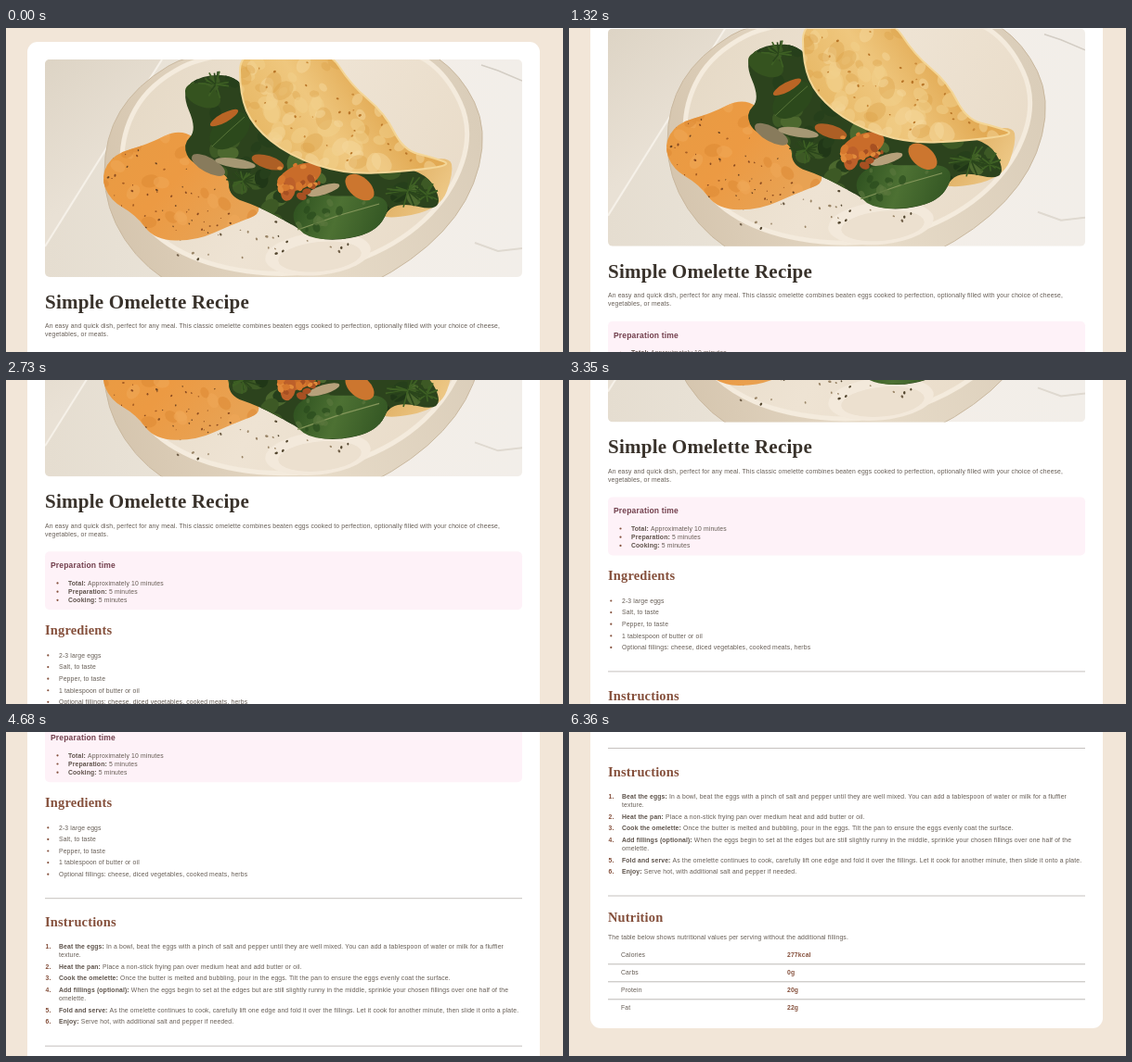
Recreate the animation shown at these times as an HTML page with a canvas. Size 600 by 350 pixels, loop 6.91 s.

```html
<!DOCTYPE html>
<html lang="en">
<head>
<meta charset="utf-8">
<title>Simple Omelette Recipe</title>
<style>
  html, body { margin: 0; width: 100%; height: 100%; overflow: hidden; background: #f2e6d8; }
  canvas { display: block; }
</style>
</head>
<body>
<canvas id="stage" width="600" height="350"></canvas>
<script>
const ctx = document.getElementById('stage').getContext('2d');

const SANS = '"Liberation Sans", Arial, sans-serif';
const SERIF = '"Liberation Serif", "Times New Roman", serif';
const STYLE = {
  title: { font: `bold 21px ${SERIF}`, gap: 0.25, color: '#39322b' },
  section: { font: `bold 14.4px ${SERIF}`, gap: 0.2, color: '#85503c' },
  label: { font: `bold 8.5px ${SANS}`, gap: 0.18, color: '#713f4c' },
  body: { font: `6.8px ${SANS}`, gap: 0.153, color: '#655c54' },
  strong: { font: `bold 6.8px ${SANS}`, gap: 0.153, color: '#5c5149' },
  accent: { font: `bold 6.8px ${SANS}`, gap: 0.153, color: '#85503c' }
};

// Scroll timeline: [time, offset, speed]
const LOOP = 6910, START = 770, END = 6360, STEP = (END - START) / 80;
const KEYS = [
  [700, 0, 0], [1320, 32.5, 0.084], [1950, 91, 0.094], [2730, 165, 0.095],
  [3980, 284, 0.101], [5380, 434, 0.104], [END, 521, 0]
];

function scrollAt(time) {
  if (time < START) return 0;
  const t = Math.min(END, START + Math.floor((time - START + 10) / STEP) * STEP);
  let i = 0;
  while (i < KEYS.length - 2 && t >= KEYS[i + 1][0]) i++;
  const [t0, y0, v0] = KEYS[i], [t1, y1, v1] = KEYS[i + 1];
  const d = t1 - t0, u = (t - t0) / d, w = 1 - u;
  return y0 * w * w * (1 + 2 * u) + y1 * u * u * (3 - 2 * u)
    + d * u * w * (v0 * w - v1 * u);
}

function seeded(seed) {
  return () => (seed = (seed * 16807) % 2147483647) / 2147483647;
}

function text(str, x, y, style) {
  ctx.font = style.font;
  ctx.letterSpacing = style.gap + 'px';
  ctx.fillStyle = style.color;
  ctx.fillText(str, x, y);
  return x + ctx.measureText(str).width;
}

function leadText(lead, rest, x, y) {
  text(' ' + rest, text(lead, x, y, STYLE.strong), y, STYLE.body);
}

function box(x, y, w, h, r, color) {
  ctx.beginPath();
  ctx.roundRect(x, y, w, h, r);
  ctx.fillStyle = color;
  ctx.fill();
}

function oval(x, y, rx, ry, color, turn = 0) {
  ctx.beginPath();
  ctx.ellipse(x, y, rx, ry, turn, 0, Math.PI * 2);
  ctx.fillStyle = color;
  ctx.fill();
}

function line(points, color, width) {
  ctx.beginPath();
  points.forEach(([x, y]) => ctx.lineTo(x, y));
  ctx.strokeStyle = color;
  ctx.lineWidth = width;
  ctx.stroke();
}

// Closed smooth outline through the midpoints of the given points
function blob(points) {
  const path = new Path2D();
  const n = points.length;
  const mid = i => {
    const a = points[i % n], b = points[(i + 1) % n];
    return [(a[0] + b[0]) / 2, (a[1] + b[1]) / 2];
  };
  path.moveTo(...mid(0));
  for (let i = 1; i <= n; i++) path.quadraticCurveTo(...points[i % n], ...mid(i));
  path.closePath();
  return path;
}

function gradient(x0, y0, x1, y1, ...colors) {
  const g = ctx.createLinearGradient(x0, y0, x1, y1);
  colors.forEach((c, i) => g.addColorStop(i / (colors.length - 1), c));
  return g;
}

function specks(seed, count, area, size, colors, clip) {
  const rand = seeded(seed), [x, y, w, h] = area;
  ctx.save();
  if (clip) ctx.clip(clip);
  for (let i = 0; i < count; i++) {
    const px = x + rand() * w, py = y + rand() * h, r = size * (0.4 + rand() * 0.6);
    oval(px, py, r * 1.4, r, colors[Math.floor(rand() * colors.length)], rand() * 3);
  }
  ctx.restore();
}

const plate = blob([[210, 20], [140, 62], [106, 118], [106, 195], [150, 262], [225, 300],
  [345, 300], [440, 252], [500, 188], [519, 110], [490, 50], [440, 15]]);
const plateInside = blob([[225, 24], [155, 60], [124, 115], [126, 180], [165, 232], [235, 262],
  [330, 268], [420, 236], [480, 180], [503, 110], [475, 50], [430, 20]]);
const sauce = blob([[102, 160], [116, 136], [152, 126], [188, 108], [215, 128], [243, 160],
  [282, 198], [244, 212], [205, 230], [160, 229], [140, 202], [112, 186]]);
const greens = blob([[188, 68], [212, 50], [252, 52], [268, 92], [300, 125], [370, 150],
  [452, 150], [474, 200], [415, 186], [400, 222], [340, 232], [308, 212], [270, 192],
  [240, 182], [240, 156], [200, 148], [190, 126], [206, 110]]);
const flap = blob([[430, 148], [478, 138], [482, 156], [468, 196], [405, 208], [390, 190]]);
const shell = blob([[252, 20], [252, 72], [266, 106], [305, 138], [365, 158], [430, 155],
  [482, 148], [460, 140], [428, 132], [408, 92], [372, 62], [345, 20]]);
const leaf = blob([[306, 200], [325, 180], [365, 182], [405, 180], [414, 196], [396, 222],
  [350, 230], [318, 224]]);

function fill(path, color) {
  ctx.fillStyle = color;
  ctx.fill(path);
}

function sprig(x, y, size, seed) {
  const rand = seeded(seed);
  for (let i = 0; i < 22; i++) {
    const a = rand() * Math.PI * 2, r = size * (0.5 + rand() * 0.5);
    line([[x, y], [x + Math.cos(a) * r, y + Math.sin(a) * r * 0.8]],
      i % 2 ? '#3e6024' : '#2a451b', 1.6);
  }
}

function photo() {
  ctx.save();
  ctx.beginPath();
  ctx.roundRect(42, 34, 514, 235, 5);
  ctx.clip();
  ctx.fillStyle = gradient(42, 0, 556, 0, '#e5ddd0', '#eae4d9', '#f3eee8', '#f2eee9');
  ctx.fillRect(42, 34, 514, 235);
  fill(new Path2D('M42 34H168L42 236Z'), gradient(42, 34, 130, 140, '#ddd4c5', '#e9e1d5'));
  line([[168, 34], [42, 236]], '#f6f1e9', 2);
  line([[512, 40], [530, 46], [556, 57]], '#d3cdc4', 1.5);
  line([[505, 232], [530, 241], [556, 238]], '#dfd9d0', 2);

  fill(plate, gradient(110, 200, 510, 90, '#d5c5ae', '#e6dac7', '#dacdb9'));
  ctx.strokeStyle = '#c9b89f';
  ctx.lineWidth = 1;
  ctx.stroke(plate);
  fill(plateInside, gradient(150, 60, 460, 230, '#e6dac7', '#eee3d3', '#e9dcc9'));
  ctx.strokeStyle = '#f4ebdd';
  ctx.lineWidth = 5;
  ctx.stroke(plateInside);
  oval(336, 244, 57, 23, '#f3e9db', -0.1);
  oval(338, 247, 45, 16, '#ece0cf', -0.1);
  specks(83, 45, [185, 195, 190, 55], 1.3, ['#72614a', '#9a8567', '#53462f']);

  fill(sauce, gradient(120, 125, 230, 220, '#e99b43', '#ec9a43', '#e8a253'));
  specks(19, 45, [105, 110, 170, 115], 7, ['#f0aa5988', '#de8a3488'], sauce);
  specks(41, 75, [110, 120, 160, 105], 1.1, ['#8b4b20', '#a85f25', '#6d4522'], sauce);

  fill(flap, gradient(405, 155, 475, 200, '#dca859', '#f0cd8d'));
  fill(greens, '#2c431d');
  specks(61, 75, [188, 50, 285, 180], 9, ['#203717', '#3d5925', '#4c682e', '#263f1b'], greens);
  oval(212, 73, 20, 12, '#35531f', 0.4);
  oval(241, 111, 25, 16, '#2c491c', -0.7);
  line([[222, 128], [239, 112], [257, 96]], '#587539', 1);
  fill(leaf, gradient(310, 190, 400, 220, '#2f5220', '#4d7133', '#365925'));
  line([[314, 218], [360, 202], [402, 190]], '#84965a', 1.2);
  specks(29, 14, [315, 185, 85, 36], 4, ['#5c793f99', '#27481b99'], leaf);
  sprig(433, 176, 25, 17);
  sprig(453, 180, 17, 23);
  sprig(255, 165, 20, 31);
  sprig(226, 61, 20, 47);
  oval(218, 148, 20, 8, '#887b5c', 0.5);
  oval(247, 146, 22, 5, '#a69874', 0.15);
  oval(342, 175, 18, 5, '#b7a17b', -0.3);
  oval(235, 97, 17, 5, '#b96525', -0.5);
  oval(282, 145, 18, 7, '#ad5f25', 0.3);
  oval(316, 161, 25, 13, '#c96c2a', -0.4);
  oval(304, 174, 8, 13, '#bd602a', 0.2);
  oval(381, 172, 18, 11, '#cc762f', 0.7);
  specks(77, 22, [295, 147, 44, 35], 4, ['#e18a3b', '#a75022', '#d6782e']);

  fill(shell, gradient(280, 125, 390, 55, '#e8b967', '#efc77e', '#e2aa54'));
  specks(101, 90, [250, 34, 220, 120], 9, ['#f2d08b88', '#d99b4255', '#f4d99e77'], shell);
  specks(53, 35, [255, 35, 190, 115], 1.3, ['#b97628', '#c98a39'], shell);
  ctx.strokeStyle = '#f4d697';
  ctx.lineWidth = 2;
  ctx.stroke(shell);
  ctx.restore();
}

function rule(y, color = '#c5c1be') {
  ctx.fillStyle = color;
  ctx.fillRect(42, y - 0.5, 514, 1);
}

function bullets(items, x, y, step, indent) {
  items.forEach((item, i) => {
    const base = y + i * step;
    oval(x, base - 2.3, 1.1, 1.1, '#85503c');
    if (Array.isArray(item)) leadText(...item, x + indent, base);
    else text(item, x + indent, base, STYLE.body);
  });
}

const TIMES = [['Total:', 'Approximately 10 minutes'], ['Preparation:', '5 minutes'], ['Cooking:', '5 minutes']];
const INGREDIENTS = ['2-3 large eggs', 'Salt, to taste', 'Pepper, to taste', '1 tablespoon of butter or oil',
  'Optional fillings: cheese, diced vegetables, cooked meats, herbs'];
const STEPS = [
  ['Beat the eggs:', 'In a bowl, beat the eggs with a pinch of salt and pepper until they are well mixed. You can add a tablespoon of water or milk for a fluffier', 'texture.'],
  ['Heat the pan:', 'Place a non-stick frying pan over medium heat and add butter or oil.'],
  ['Cook the omelette:', 'Once the butter is melted and bubbling, pour in the eggs. Tilt the pan to ensure the eggs evenly coat the surface.'],
  ['Add fillings (optional):', 'When the eggs begin to set at the edges but are still slightly runny in the middle, sprinkle your chosen fillings over one half of the', 'omelette.'],
  ['Fold and serve:', 'As the omelette continues to cook, carefully lift one edge and fold it over the fillings. Let it cook for another minute, then slide it onto a plate.'],
  ['Enjoy:', 'Serve hot, with additional salt and pepper if needed.']
];
const NUTRITION = [['Calories', '277kcal'], ['Carbs', '0g'], ['Protein', '20g'], ['Fat', '22g']];

function page() {
  box(23, 15, 552, 826, 11, '#fff');
  photo();
  text('Simple Omelette Recipe', 42, 303, STYLE.title);
  text('An easy and quick dish, perfect for any meal. This classic omelette combines beaten eggs cooked to perfection, optionally filled with your choice of cheese,', 42, 324.2, STYLE.body);
  text('vegetables, or meats.', 42, 333.4, STYLE.body);

  box(42, 350, 514, 63, 5, '#fef2f8');
  text('Preparation time', 48, 368, STYLE.label);
  bullets(TIMES, 55.5, 386.4, 9.2, 11.5);

  text('Ingredients', 42, 440, STYLE.section);
  bullets(INGREDIENTS, 45.3, 464.4, 12.6, 11.7);
  rule(538.5);

  text('Instructions', 42, 569.3, STYLE.section);
  let y = 592.7;
  STEPS.forEach(([lead, rest, wrapped], i) => {
    text(i + 1 + '.', 42.5, y, STYLE.accent);
    leadText(lead, rest, 57, y);
    if (wrapped) text(wrapped, 57, y += 9.2, STYLE.body);
    y += 12.6;
  });
  rule(698);

  text('Nutrition', 42, 726.3, STYLE.section);
  text('The table below shows nutritional values per serving without the additional fillings.', 42, 745, STYLE.body);
  NUTRITION.forEach(([name, value], i) => {
    const base = 764.4 + i * 19;
    text(name, 56, base, STYLE.body);
    text(value, 235, base, STYLE.accent);
    if (i < 3) rule(base + 7.4, '#bdb9b6');
  });
}

const origin = performance.now();
let shown = -1;

function frame() {
  const offset = scrollAt((performance.now() - origin) % LOOP);
  if (offset !== shown) {
    shown = offset;
    ctx.fillStyle = '#f2e6d8';
    ctx.fillRect(0, 0, 600, 350);
    ctx.save();
    ctx.translate(0, -offset);
    page();
    ctx.restore();
  }
  requestAnimationFrame(frame);
}
frame();
</script>
</body>
</html>
```
